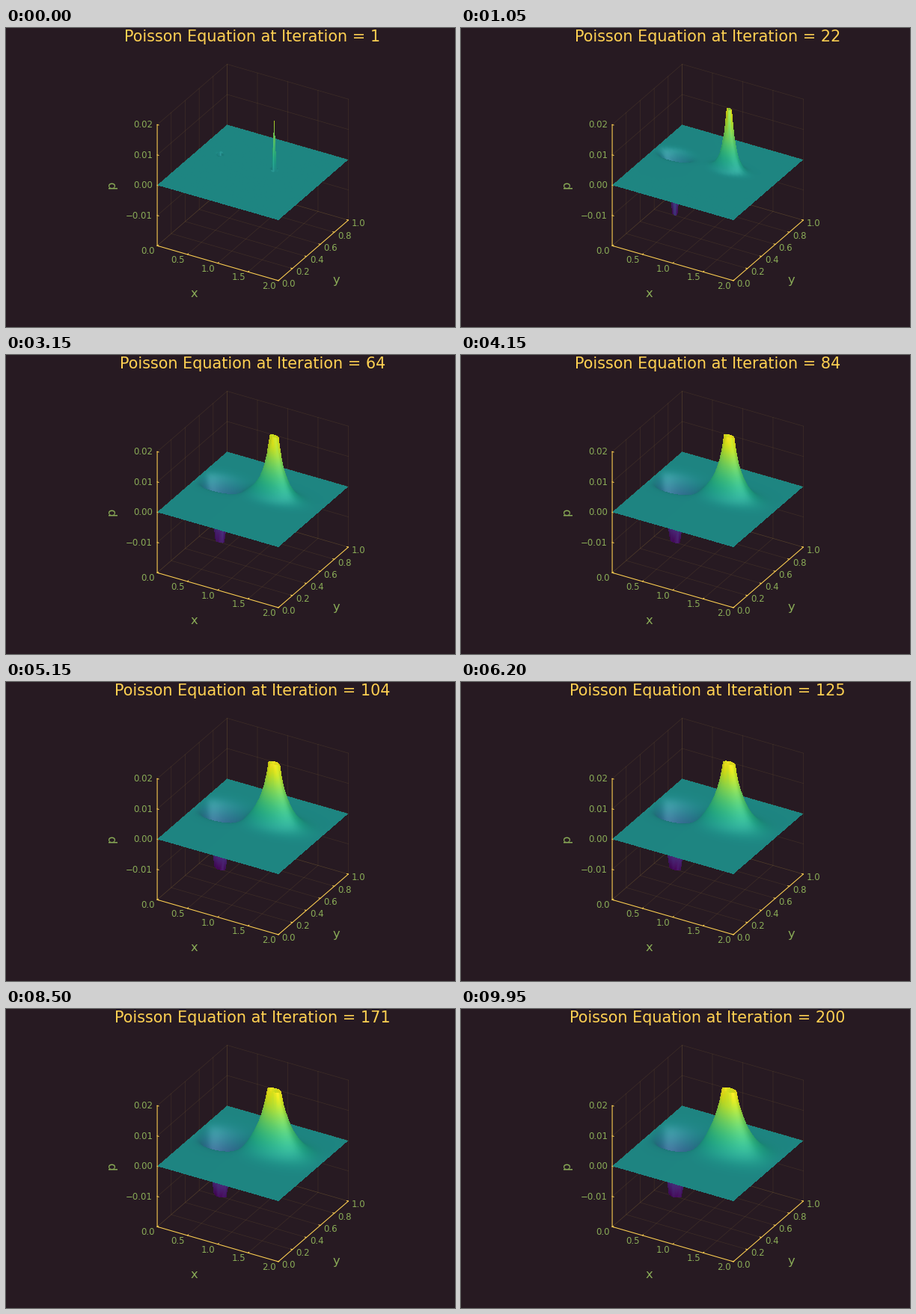
A matplotlib script for the animation above (10 s loop, 600 by 400 pixels).

```python
import numpy as np
import matplotlib as mpl
import matplotlib.pyplot as plt
from matplotlib.animation import FuncAnimation

W, H = 600, 400
FRAMES, INTERVAL = 200, 50
BG, GOLD, GREEN = "#271a22", "#ffd152", "#8aac57"
N = 50
ZMAX = 0.02

# Orthographic camera: unit cube axes in screen pixels
CENTER = np.array([329.75, 193.2])
AXES = np.array([[161.9, 46.7], [93.45, -80.9], [0.0, -161.9]])
VIEW = np.array([0.433, -0.75, 0.5])


def project(u, v, w):
    """Screen position of a point given in unit cube coordinates."""
    return CENTER + np.array([u - 0.5, v - 0.5, w - 0.5]) @ AXES


# --- Poisson solver (Jacobi) ---
def solve(steps):
    a2, b2 = (2 / (N - 1)) ** 2, (1 / (N - 1)) ** 2
    src = np.zeros((N, N))
    src[30, 30], src[8, 30] = 100, -100
    p = np.zeros((N, N))
    out = []
    for _ in range(steps):
        q = p.copy()
        q[1:-1, 1:-1] = (
            (p[2:, 1:-1] + p[:-2, 1:-1]) * a2
            + (p[1:-1, 2:] + p[1:-1, :-2]) * b2
            + src[1:-1, 1:-1] * a2 * b2
        ) / (2 * (a2 + b2))
        p = q
        out.append(p)
    return out


# --- Surface mesh, triangles sorted back to front ---
grid = np.linspace(0, 1, N)
U, V = np.meshgrid(grid, grid, indexing="ij")
ids = np.arange(N * N).reshape(N, N)
c00, c10 = ids[:-1, :-1].ravel(), ids[1:, :-1].ravel()
c01, c11 = ids[:-1, 1:].ravel(), ids[1:, 1:].ravel()
TRI = np.concatenate([np.stack([c00, c10, c01], 1), np.stack([c10, c11, c01], 1)])
depth = (U * VIEW[0] + V * VIEW[1]).ravel()[TRI].mean(1)
TRI = TRI[np.argsort(depth, kind="stable")]
MESH_X = (CENTER[0] + (U - 0.5) * AXES[0, 0] + (V - 0.5) * AXES[1, 0]).ravel()
FLAT_Y = (CENTER[1] + (U - 0.5) * AXES[0, 1] + (V - 0.5) * AXES[1, 1]).ravel()
TX = MESH_X[TRI]
VIRIDIS = mpl.colormaps["viridis"]


def unit(v):
    return v / np.maximum(np.linalg.norm(v, axis=1, keepdims=True), 1e-9)


def pixel_span(c, size):
    lo = np.clip(np.ceil(c.min(1) - 0.5), 0, size).astype(int)
    hi = np.clip(np.floor(c.max(1) - 0.5), -1, size - 1).astype(int)
    return lo, np.maximum(hi - lo + 1, 0)


def render(p):
    """Rasterise the height field, cut off at the z limits."""
    height = p / (2 * ZMAX)
    gu, gv = np.gradient(height, 1 / (N - 1))
    normal = unit(np.stack([-gu, -gv, np.ones_like(p)], -1).reshape(-1, 3))
    tone = np.clip(height + 0.5, 0, 1).reshape(-1, 1)

    ty = (FLAT_Y + height.ravel() * AXES[2, 1])[TRI]
    x0, w = pixel_span(TX, W)
    y0, h = pixel_span(ty, H)
    count = w * h
    t = np.repeat(np.arange(len(TRI)), count)
    k = np.arange(len(t)) - np.repeat(np.cumsum(count) - count, count)
    col, row = x0[t] + k % w[t], y0[t] + k // w[t]

    # Barycentric weights at the pixel centres
    ex, ey = TX - TX[:, 2:], ty - ty[:, 2:]
    det = ex[:, 0] * ey[:, 1] - ex[:, 1] * ey[:, 0]
    det = np.where(np.abs(det) < 1e-9, 1e-9, det)
    dx, dy = col + 0.5 - TX[t, 2], row + 0.5 - ty[t, 2]
    a = (dx * ey[t, 1] - dy * ex[t, 1]) / det[t]
    b = (dy * ex[t, 0] - dx * ey[t, 0]) / det[t]
    inside = (a >= -1e-7) & (b >= -1e-7) & (a + b <= 1 + 1e-7)
    t, a, b, col, row = (s[inside] for s in (t, a, b, col, row))
    weights = np.stack([a, b, 1 - a - b], 1)[:, :, None]

    def blend(values):
        return (values[TRI[t]] * weights).sum(1)

    keep = np.abs(blend(p.reshape(-1, 1))[:, 0]) <= ZMAX
    light = np.minimum(np.abs(unit(blend(normal)) @ VIEW), 1)[:, None]
    base = VIRIDIS(blend(tone)[:, 0])[:, :3]
    rgb = base * (0.84 + 0.16 * light) + 0.1 * light**8
    img = np.zeros((H, W, 4), np.uint8)
    img[row[keep], col[keep], :3] = np.clip(rgb[keep] * 255, 0, 255)
    img[row[keep], col[keep], 3] = 255
    return img


# --- Static scene ---
fig = plt.figure(figsize=(W / 100, H / 100), dpi=100, facecolor=BG)
ax = fig.add_axes([0, 0, 1, 1])
ax.set_xlim(0, W)
ax.set_ylim(H, 0)
ax.axis("off")


def line(points, **style):
    xy = np.array([project(*q) for q in points])
    ax.plot(xy[:, 0], xy[:, 1], color=GOLD, **style)


def label(x, y, s, size, ha="center", color=GREEN, **style):
    style.setdefault("va", "baseline")
    return ax.text(x, y, s, fontsize=size, ha=ha, color=color,
                   family="DejaVu Sans", **style)


faint = dict(lw=0.5, alpha=0.1, zorder=1)
for s in np.linspace(0, 1, 5):
    line([(s, 0, 0), (s, 1, 0), (s, 1, 1)], **faint)
    line([(0, 0, s), (0, 1, s), (1, 1, s)], **faint)
for s in np.linspace(0, 1, 6):
    line([(1, s, 0), (0, s, 0), (0, s, 1)], **faint)

solid = dict(lw=0.75, zorder=2)
line([(0, 0, 1), (0, 0, 0), (1, 0, 0), (1, 1, 0)], **solid)
TICK = 0.012
for s in np.linspace(0, 1, 5):
    line([(s, 0, 0), (s, TICK, 0)], **solid)
    line([(0, 0, s), (TICK, 0, s)], **solid)
for s in np.linspace(0, 1, 6):
    line([(1, s, 0), (1 - TICK, s, 0)], **solid)

SMALL = 8.5
for i in range(5):
    x, y = project(i / 4, 0, 0)
    label(x - 12.6, y + 11, f"{i / 2:.1f}", SMALL)
    if i:
        x, y = project(0, 0, i / 4)
        value = f"{(i - 2) / 100:.2f}".replace("-", "\u2212")
        label(195.8, y + 4, value, SMALL, ha="right")
for i in range(6):
    x, y = project(1, i / 5, 0)
    label(x + 14, y + 8.4, f"{i / 5:.1f}", SMALL)

label(251.6, 359.6, "x", 11.8)
label(441, 341.6, "y", 11.8)
label(141.2, 210, "p", 11.8, va="center", rotation=90)
title = label(329.4, 18, "", 14.94, color=GOLD)

states = solve(FRAMES)
surface = ax.imshow(np.zeros((H, W, 4), np.uint8), extent=(0, W, H, 0),
                    interpolation="nearest", aspect="auto", zorder=3)


def update(i):
    surface.set_data(render(states[i]))
    title.set_text(f"Poisson Equation at Iteration = {i + 1}")
    return surface, title


anim = FuncAnimation(fig, update, frames=FRAMES, interval=INTERVAL,
                     repeat=True, repeat_delay=0, blit=False)
plt.show()
```
